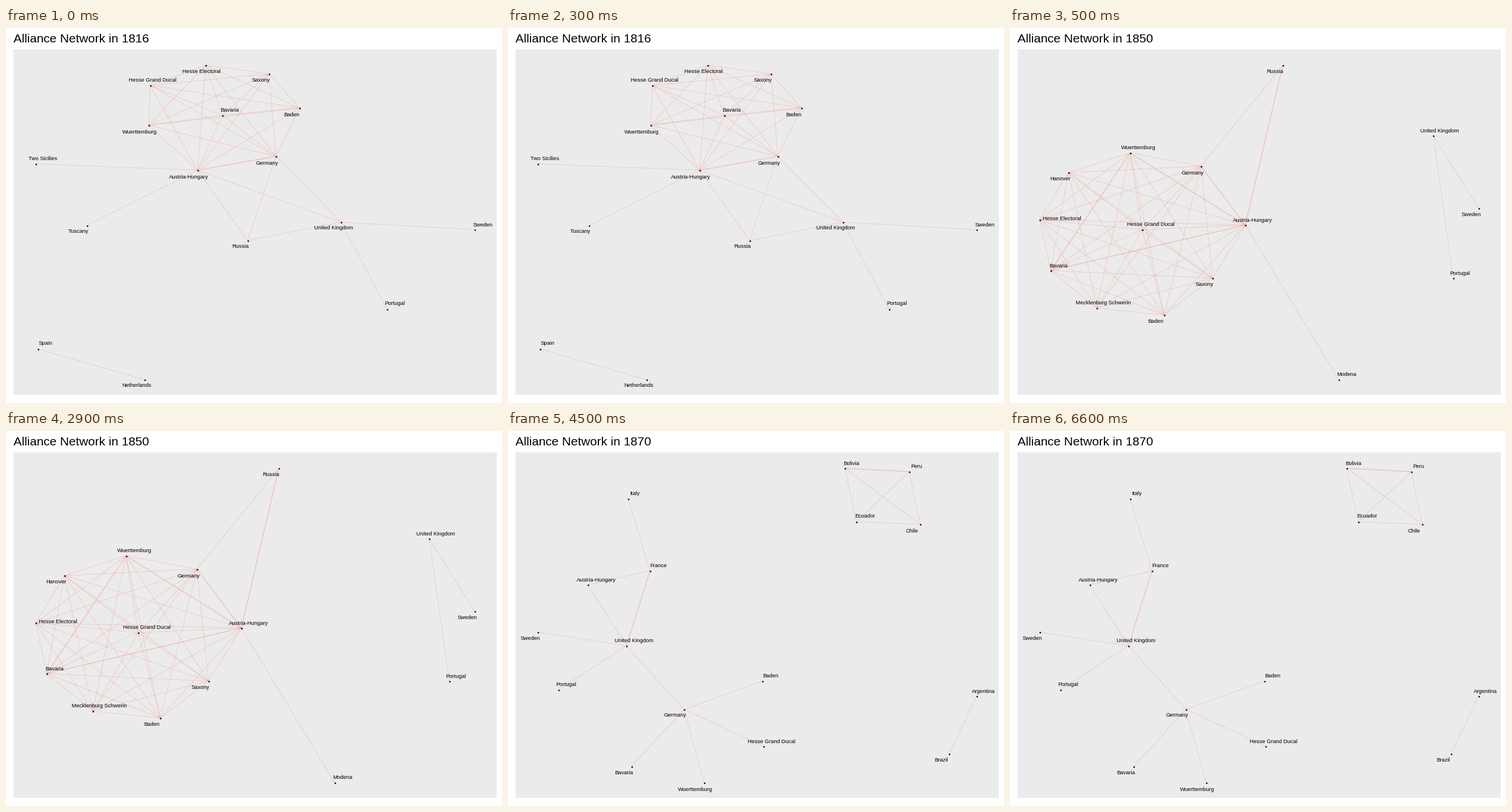
Animation of 861x650 px, one loop 8000 ms. Source, as a matplotlib script:

```python
from itertools import combinations

import matplotlib.pyplot as plt
from matplotlib.animation import FuncAnimation
from matplotlib.collections import LineCollection
from matplotlib.patches import Rectangle

W, H, DPI = 861, 650, 64
PX = 72 / DPI  # points per pixel
STEP, FRAMES = 500, 16
EDGE = (248 / 255, 118 / 255, 109 / 255, 0.2)

plt.rcParams["font.family"] = "Liberation Sans"

# name: (node x, node y, label centre x, label centre y)
NODES_1816 = {
    "Hesse Electoral": (346, 64, 339.5, 75),
    "Saxony": (456, 79, 442, 90),
    "Hesse Grand Ducal": (250, 99, 254.5, 90),
    "Baden": (509, 138, 495.5, 150),
    "Bavaria": (375, 151, 388, 142),
    "Wuerttemburg": (247, 168, 232, 180),
    "Germany": (468, 222, 453, 233.5),
    "Austria-Hungary": (332, 246, 317.5, 257.5),
    "Two Sicilies": (51, 235, 64, 226),
    "Tuscany": (140, 342, 126, 352),
    "Russia": (419, 368, 407, 378),
    "United Kingdom": (581, 336, 568.5, 346),
    "Sweden": (813, 349, 827.5, 341),
    "Portugal": (661, 487, 675, 477),
    "Spain": (55, 556, 68.5, 546),
    "Netherlands": (240, 609, 227, 619),
}

NODES_1850 = {
    "Wuerttemburg": (208, 216, 223, 207),
    "Germany": (331, 239, 317, 250.5),
    "Hanover": (101, 250, 87, 260.5),
    "Hesse Electoral": (51, 332, 90, 329.5),
    "Hesse Grand Ducal": (229, 349, 244, 340),
    "Austria-Hungary": (408, 341, 421, 332.5),
    "Bavaria": (70, 420, 84, 412),
    "Saxony": (351, 433, 337.5, 444),
    "Mecklenburg Schwerin": (150, 485, 162, 476),
    "Baden": (267, 497, 252.5, 508),
    "Russia": (473, 64, 460, 75),
    "Modena": (570, 609, 584, 600),
    "United Kingdom": (734, 186, 746, 178),
    "Sweden": (813, 312, 801, 322.5),
    "Portugal": (769, 433, 780.5, 424.5),
}

NODES_1870 = {
    "Bolivia": (584, 64, 596, 56),
    "Peru": (696, 70, 709.5, 61),
    "Ecuador": (604, 157, 619.5, 147),
    "Chile": (715, 161, 701, 172.5),
    "Italy": (208, 117, 220, 108),
    "France": (246, 242, 260.5, 233),
    "Austria-Hungary": (138, 266, 153, 257.5),
    "United Kingdom": (205, 372, 218.5, 363),
    "Sweden": (51, 348, 39, 359),
    "Portugal": (87, 448, 100.5, 438.5),
    "Germany": (305, 482, 290, 492),
    "Baden": (441, 433, 456, 423.5),
    "Hesse Grand Ducal": (443, 546, 457.5, 537.5),
    "Bavaria": (214, 581, 201.5, 591.5),
    "Wuerttemburg": (340, 609, 325, 620.5),
    "Argentina": (813, 459, 825.5, 450.5),
    "Brazil": (765, 559, 752, 569.5),
}


def clique(nodes, count):
    """Join each pair of the first `count` nodes."""
    return list(combinations(list(nodes)[:count], 2))


def star(hub, *others):
    return [(hub, other) for other in others]


AH, UK, HGD = "Austria-Hungary", "United Kingdom", "Hesse Grand Ducal"

# A pair listed twice is a double alliance and looks darker.
EDGES_1816 = (
    clique(NODES_1816, 8)
    + star(AH, "Germany", "Two Sicilies", "Tuscany", "Russia", UK)
    + star("Germany", "Russia", UK)
    + star(UK, "Russia", "Sweden", "Portugal")
    + star("Spain", "Netherlands")
)
EDGES_1850 = (
    clique(NODES_1850, 10)
    + star(AH, "Germany", "Wuerttemburg", "Bavaria", "Russia", "Russia", "Modena")
    + star("Wuerttemburg", "Bavaria")
    + star("Germany", "Russia")
    + star(UK, "Sweden", "Portugal")
)
EDGES_1870 = (
    clique(NODES_1870, 4)
    + star("Bolivia", "Peru")
    + star("France", "Italy", AH, UK, UK)
    + star(UK, AH, "Sweden", "Portugal", "Germany")
    + star("Germany", "Baden", HGD, "Bavaria", "Wuerttemburg")
    + star("Argentina", "Brazil")
)

fig = plt.figure(figsize=(W / DPI, H / DPI), dpi=DPI, facecolor="white")
ax = fig.add_axes([0, 0, 1, 1])
ax.set(xlim=(0, W), ylim=(H, 0))
ax.axis("off")
ax.add_patch(Rectangle((13, 37), 839, 599, fc="#EBEBEB", ec="none"))
title = ax.text(13, 25, "", fontsize=21.33 * PX, color="black")


def build(nodes, edges):
    """Draw one year's network and return its artists."""
    at = {name: (x + 0.5, y + 0.5) for name, (x, y, _, _) in nodes.items()}
    lines = LineCollection([(at[a], at[b]) for a, b in edges],
                           colors=[EDGE], linewidths=1.4 * PX, zorder=2)
    ax.add_collection(lines)
    dots, = ax.plot(*zip(*at.values()), "o", color="black", ms=2.7 * PX,
                    mew=0, zorder=3)
    labels = [ax.text(x, y + 3.4, name, fontsize=9.48 * PX, color="black",
                      ha="center", zorder=4)
              for name, (_, _, x, y) in nodes.items()]
    return [lines, dots, *labels]


networks = {
    1816: build(NODES_1816, EDGES_1816),
    1850: build(NODES_1850, EDGES_1850),
    1870: build(NODES_1870, EDGES_1870),
}


def year_at(ms):
    return 1816 if ms < 500 else 1850 if ms < 4500 else 1870


def draw(i):
    year = year_at(i * STEP)
    title.set_text(f"Alliance Network in {year}")
    for key, artists in networks.items():
        for artist in artists:
            artist.set_visible(key == year)
    return []


anim = FuncAnimation(fig, draw, frames=FRAMES, interval=STEP,
                     init_func=lambda: draw(0), repeat=True, repeat_delay=0,
                     blit=False)
plt.show()
```
